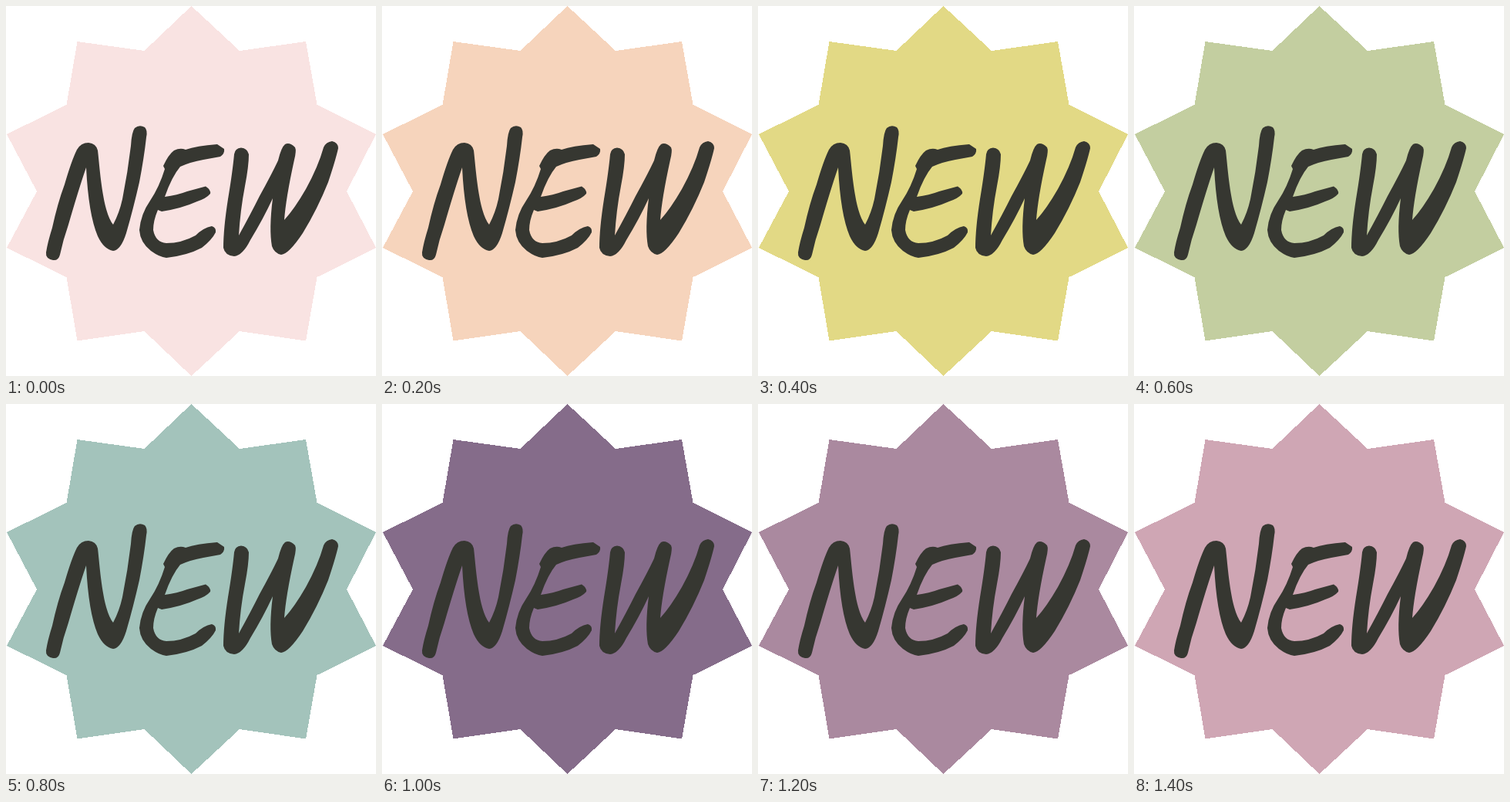
An HTML page for the animation above (1.6 s loop, 480 by 479 pixels).

```html
<!DOCTYPE html>
<html lang="en">
<head>
<meta charset="utf-8">
<title>New badge</title>
<style>
  html, body { margin: 0; width: 100%; height: 100%; overflow: hidden; background: #fff; }
  svg { display: block; width: 100%; height: 100%; }
</style>
</head>
<body>
<svg viewBox="0 0 480 479" role="img" aria-label="NEW">
  <polygon id="star" fill="#f9e3e2" shape-rendering="crispEdges" points="240.5,0 303,58 389,46 403.500,128 480,166 442,240 480,313 403.500,351 389,433.500 303,421 240.500,479 179.500,421 92.500,433.500 78.500,351 1,313 40,240 1,166 78.500,128 92.500,46 179.500,58"/>
  <g fill="#363731">
    <path d="M52 319Q54 306 60 287Q67 255 76 231Q85 200 92 186Q97 177 107 177Q117 178 119 187C121 203 123 236 130 263Q134 277 139 283Q147 268 151 250Q158 215 162 181Q163 163 167 158Q173 153 180 157Q184 161 182 170Q179 197 173 228Q165 263 156 294Q149 316 139 317Q127 315 119 298Q107 270 104 209Q94 238 81 283Q74 303 70 322Q68 330 61 329Q51 327 52 319Z"/>
    <path d="M204 207Q211 192 218 187Q226 183 233 186Q247 181 274 179L283 185Q284 191 278 195L256 199Q239 202 226 208Q215 221 206 247Q222 245 235 240L259 233.500Q266 238 265 243Q260 249 248 253Q228 262 202 266L197 264Q191 278 191 290Q194 306 208 307Q228 307 246 297Q256 287 267 285Q273 287 272 293Q267 303 254 313Q235 323 208 326Q199 325 188 317Q174 306 173 290Q175 269 187 252Q199 234 206 211Z"/>
    <path d="M296 192Q297 184 305 183.500Q313 184 315 192Q315 207 310 233Q304 264 302 297Q317 270 329 246Q344 219 353 200Q357 183 362 179Q368 176 375 183Q377 187 374 199Q363 249 361 277Q374 263 389 237Q405 208 412 183Q415 176 423 175Q431 177 431 184Q428 198 418 228Q404 263 385 294Q367 321 357 322Q348 320 345 311Q341 289 346 249Q334 275 317 303Q307 323 296 324Q284 323 282 313Q282 288 288 250Q294 214 296 192Z"/>
  </g>
</svg>
<script>
  const colors = ["#f9e3e2", "#f6d4bc", "#e2d985", "#c3cea0",
                  "#a3c3bb", "#856c8a", "#aa899f", "#cfa6b4"];
  const star = document.getElementById("star");
  const step = 200;

  function draw() {
    const i = Math.floor(performance.now() / step) % colors.length;
    star.setAttribute("fill", colors[i]);
    requestAnimationFrame(draw);
  }
  draw();
</script>
</body>
</html>
```
